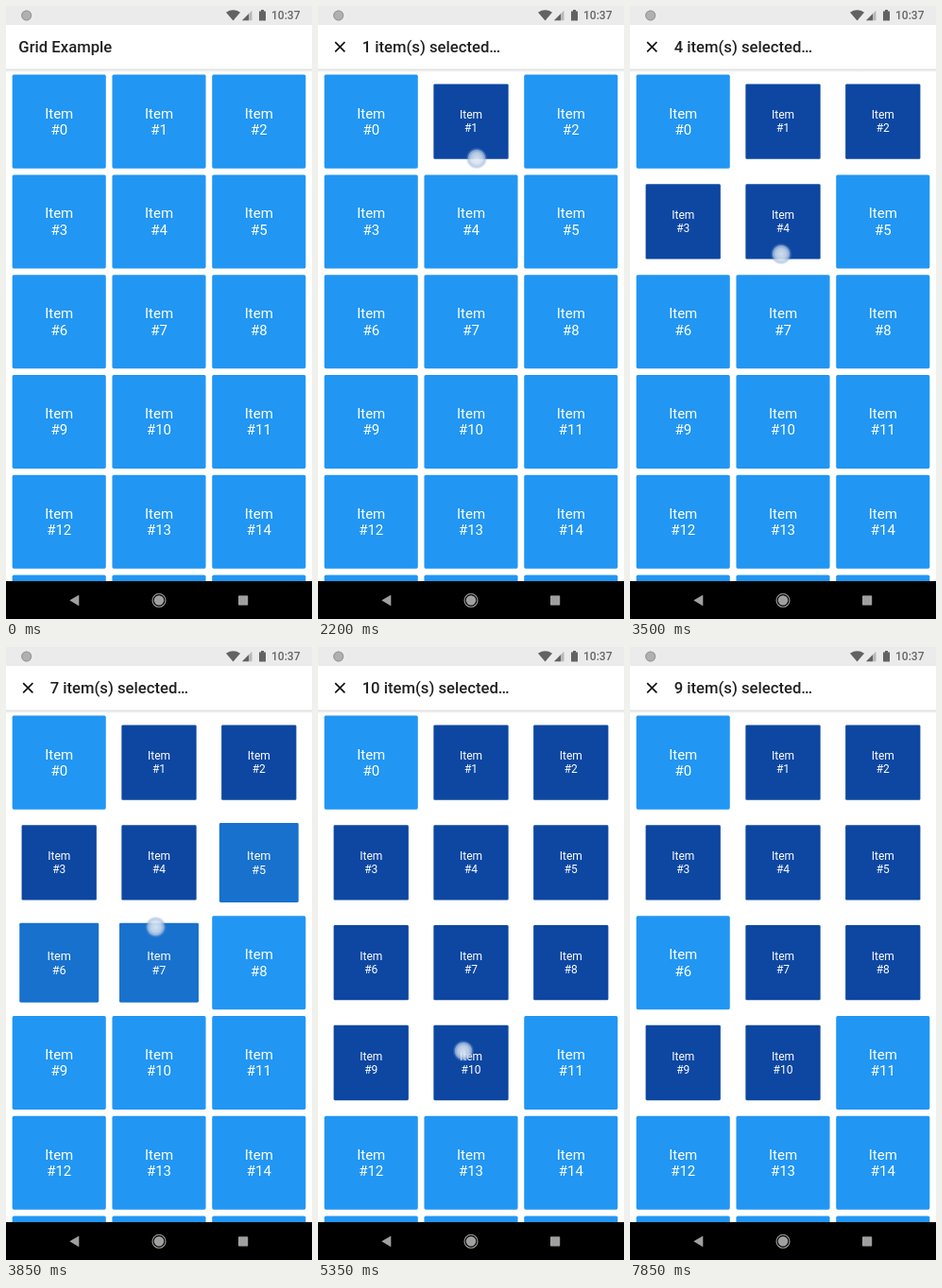
An HTML page for the animation above (8000 ms loop, 324x648 px).

```html
<!DOCTYPE html>
<html lang="en">
<head>
<meta charset="utf-8">
<title>Grid Example</title>
<style>
  html, body { margin: 0; width: 100%; height: 100%; overflow: hidden; background: #fff; }
  svg { display: block; width: 324px; height: 648px; font-family: Roboto, sans-serif; }
  .tile text { font-size: 15px; fill: #fff; text-anchor: middle; }
  #title { font-size: 16.67px; font-weight: 500; fill: #212121; }
  #clock { font-size: 12px; font-weight: 500; fill: #666; }
</style>
</head>
<body>
<svg viewBox="0 0 324 648">
  <defs>
    <linearGradient id="shade" x2="0" y2="1">
      <stop offset="0" stop-color="#000" stop-opacity=".2"/>
      <stop offset=".4" stop-color="#000" stop-opacity=".07"/>
      <stop offset="1" stop-color="#000" stop-opacity="0"/>
    </linearGradient>
    <radialGradient id="glow">
      <stop offset="0" stop-color="#e6eef6" stop-opacity=".9"/>
      <stop offset=".5" stop-color="#d3e0ee" stop-opacity=".85"/>
      <stop offset=".76" stop-color="#a9c0de" stop-opacity=".75"/>
      <stop offset=".84" stop-color="#7fa3d4" stop-opacity=".4"/>
      <stop offset="1" stop-color="#7fa3d4" stop-opacity="0"/>
    </radialGradient>
  </defs>

  <rect width="324" height="648" fill="#fff"/>
  <g id="grid"></g>

  <rect y="66.5" width="324" height="4" fill="url(#shade)"/>
  <rect width="324" height="66.5" fill="#fff"/>
  <text id="title" y="49"></text>
  <path id="close" d="M18.2 38.2l10.2 10.2m0-10.2l-10.2 10.2" stroke="#111" stroke-width="1.7"/>

  <rect width="324" height="20" fill="#ebebeb"/>
  <circle cx="21.7" cy="10" r="5.6" fill="#b0b0b0"/>
  <circle cx="21.7" cy="10" r="4.9" fill="none" stroke="#969696" stroke-width="1"/>
  <g fill="#626262">
    <path d="M233 6.7Q240.5 1.8 248 6.7L240.5 15.6Z"/>
    <path d="M250 15.3L260.5 4.8V15.3Z" fill="#b9b9b9"/>
    <path d="M250 15.3L257 8.3V15.3Z"/>
    <path d="M268 5.5h2v-1.5h3v1.5h2v10h-7z"/>
  </g>
  <text id="clock" x="281" y="14.4">10:37</text>

  <rect y="608" width="324" height="40"/>
  <g fill="#a0a0a0">
    <path d="M67.3 628.3L77.3 622.4V634.2Z"/>
    <circle cx="162" cy="628.3" r="5.3"/>
    <circle cx="162" cy="628.3" r="7" fill="none" stroke="#a0a0a0" stroke-width="1.1"/>
    <rect x="246" y="623.3" width="10.2" height="10.2" rx=".8"/>
  </g>
  <circle id="touch" r="11.5" fill="url(#glow)"/>
</svg>

<script>
const LOOP = 8000, FADE = 200;
const SIZE = 99.1, PITCH = 105.78, LEFT = 6.67, TOP = 72.6;
const LIGHT = [33, 150, 243], DARK = [13, 71, 161];
const DESELECT = { item: 6, at: 7500 };

// The drag selects every item from 1 up to `last`.
const selections = [
  { at: 1650, last: 1 },
  { at: 2500, last: 4 },
  { at: 3758, last: 7 },
  { at: 4900, last: 10 }
];
// Each gesture: points of [time, x, y]
const gestures = [
  [[1150, 169, 134], [1850, 169, 138], [2200, 168, 161], [2850, 163, 199],
   [3850, 158.5, 296], [5350, 154, 427], [5500, 154, 430], [5750, 154, 430]],
  [[7350, 66, 329], [7500, 66, 329]]
];

const $ = id => document.getElementById(id);
const clamp = v => Math.min(1, Math.max(0, v));
const mix = (a, b, k) => a + (b - a) * k;

// cubic-bezier(.25, .1, .25, 1)
function ease(x) {
  const bezier = (a, b, s) => 3 * a * s * (1 - s) ** 2 + 3 * b * s * s * (1 - s) + s ** 3;
  let lo = 0, hi = 1;
  for (let i = 0; i < 24; i++) {
    const mid = (lo + hi) / 2;
    if (bezier(.25, .25, mid) < x) lo = mid; else hi = mid;
  }
  return bezier(.1, 1, (lo + hi) / 2);
}

const tiles = Array.from({ length: 18 }, (_, i) => {
  const node = document.createElementNS("http://www.w3.org/2000/svg", "g");
  node.setAttribute("class", "tile");
  node.innerHTML = `<rect x="${-SIZE / 2}" y="${-SIZE / 2}" width="${SIZE}" height="${SIZE}" rx="1.7"/>
    <text y="-3.5">Item</text><text y="14">#${i}</text>`;
  $("grid").append(node);
  return {
    node,
    x: LEFT + SIZE / 2 + (i % 3) * PITCH,
    y: TOP + SIZE / 2 + Math.floor(i / 3) * PITCH,
    selectAt: i ? selections.find(s => i <= s.last)?.at ?? Infinity : Infinity,
    deselectAt: i === DESELECT.item ? DESELECT.at : Infinity
  };
});

function drawTile({ node, x, y, selectAt, deselectAt }, t) {
  const k = clamp((t - selectAt) / FADE) - clamp((t - deselectAt) / FADE);
  const scale = 1 - .2 * ease(k);
  node.setAttribute("transform", `translate(${x} ${y}) scale(${scale})`);
  node.setAttribute("fill", `rgb(${LIGHT.map((c, i) => Math.round(mix(c, DARK[i], k)))})`);
}

function drawTitle(t) {
  const count = tiles.filter(d => t >= d.selectAt && t < d.deselectAt).length;
  $("title").textContent = count ? `${count} item(s) selected…` : "Grid Example";
  $("title").setAttribute("x", count ? 46.67 : 13.33);
  $("close").style.display = count ? "" : "none";
}

function drawTouch(t) {
  const path = gestures.find(g => t >= g[0][0] && t < g.at(-1)[0]);
  $("touch").style.display = path ? "" : "none";
  if (!path) return;
  const next = path.findIndex(p => p[0] > t);
  const a = path[next - 1], b = path[next];
  const k = (t - a[0]) / (b[0] - a[0]);
  $("touch").setAttribute("cx", mix(a[1], b[1], k));
  $("touch").setAttribute("cy", mix(a[2], b[2], k));
}

function draw(now) {
  const t = now % LOOP;
  tiles.forEach(tile => drawTile(tile, t));
  drawTitle(t);
  drawTouch(t);
  requestAnimationFrame(draw);
}
draw(performance.now());
</script>
</body>
</html>
```
